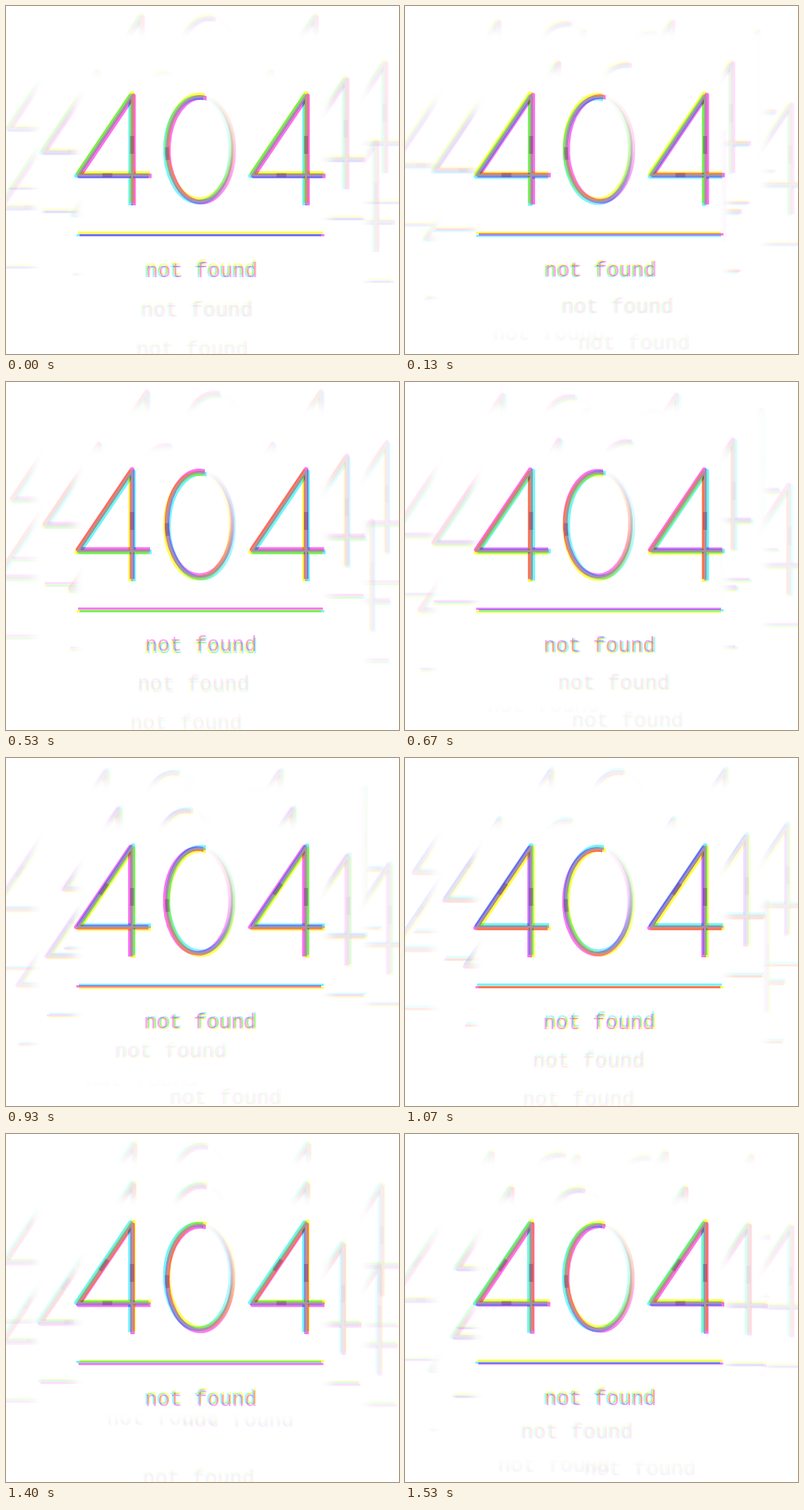
An HTML page with a canvas that plays this animation: 480x426 px, repeating every 1590 ms.

```html
<!DOCTYPE html>
<html lang="en">
<head>
<meta charset="utf-8">
<title>404 not found</title>
<style>
html, body { margin: 0; width: 100%; height: 100%; overflow: hidden; background: #fff; }
canvas { display: block; width: 480px; height: 426px; }
</style>
</head>
<body>
<canvas id="stage" width="480" height="426"></canvas>
<script>
const W = 480, H = 426, LOOP = 1590, STEPS = 24;
const TAU = Math.PI * 2, RAD = Math.PI / 180;
const INKS = [
  { rgb: [110, 244, 255], turn: 150 },
  { rgb: [255, 255, 70], turn: 270 },
  { rgb: [255, 110, 242], turn: 30 }
];
const ZERO = { x: 236.5, y: 175, rx: 40, ry: 64, gap: -84 * RAD };
const four = x => new Path2D(`M${x} 243V109L${x - 66} 207H${x + 22}`);
const fours = [four(154), four(366.5)];

const stage = document.getElementById('stage').getContext('2d');
const layer = () => {
  const c = document.createElement('canvas');
  c.width = W;
  c.height = H;
  return c.getContext('2d');
};
const art = layer(), ring = layer();

const css = ([r, g, b], a = 1) => `rgba(${r},${g},${b},${a})`;
const polar = (deg, rx, ry = rx) => [rx * Math.cos(deg * RAD), ry * Math.sin(deg * RAD)];

function zero(c, rgb, alpha = 1) {
  const g = c.createConicGradient(ZERO.gap, ZERO.x, ZERO.y);
  [[0, 0], [0.08, 0.12], [0.25, 0.4], [0.45, 0.9], [1, 1]]
    .forEach(([at, a]) => g.addColorStop(at, css(rgb, a * alpha)));
  c.strokeStyle = g;
  c.beginPath();
  c.ellipse(ZERO.x, ZERO.y, ZERO.rx, ZERO.ry, 0, ZERO.gap, ZERO.gap - TAU, true);
  c.stroke();
}

function digits(c, rgb, width, alpha = 1) {
  c.lineWidth = width;
  c.strokeStyle = css(rgb, alpha);
  fours.forEach(p => c.stroke(p));
  zero(c, rgb, alpha);
}

// Short dark patches along the strokes
function patches(c, k) {
  const spots = [[62, 22]];
  if ((k > 11 && k < 17) || k > 20) spots.push([188, 16]);
  if (k > 20 || k < 3) spots.push([282, 12]);
  c.lineWidth = 5;
  c.strokeStyle = 'rgba(90,30,100,.32)';
  for (const [at, len] of spots) {
    c.setLineDash([len, 999]);
    c.lineDashOffset = -at;
    fours.forEach(p => c.stroke(p));
  }
  c.setLineDash([]);
  c.beginPath();
  c.ellipse(ZERO.x, ZERO.y, ZERO.rx, ZERO.ry, 0, 168 * RAD, 182 * RAD);
  c.stroke();
}

function drawArt(k) {
  const c = art;
  c.clearRect(0, 0, W, H);
  c.lineJoin = 'round';
  c.textAlign = 'center';
  c.font = '25.3px "Liberation Mono", "Courier New", monospace';
  c.globalCompositeOperation = 'multiply';
  c.filter = 'blur(0.6px)';
  for (const { rgb, turn } of INKS) {
    const [dx, dy] = polar(turn - 15 * k, 2.1);
    c.save();
    c.translate(dx, dy);
    digits(c, rgb, 5.5);
    c.fillStyle = css(rgb);
    c.fillRect(88, 278.2, 299, 2.6);
    c.translate(-dx * 0.25, -dy * 0.25);
    c.fillStyle = css(rgb, 0.65);
    c.fillText('not found', 238, 331);
    c.restore();
  }
  c.globalCompositeOperation = 'source-over';
  digits(c, [188, 162, 196], 3, 0.72);
  patches(c, k);
  c.filter = 'none';
}

// Faint copies, hidden inside a soft box around the centre
function ghosts(k, count, rx, ry, alpha, box) {
  const c = ring;
  c.clearRect(0, 0, W, H);
  c.globalCompositeOperation = 'source-over';
  c.globalAlpha = alpha;
  for (let i = 0; i < count; i++) {
    const [dx, dy] = polar(96 - 14.5 * k + i * 360 / count, rx, ry);
    c.drawImage(art.canvas, dx, dy);
  }
  c.globalAlpha = 1;
  c.globalCompositeOperation = 'destination-out';
  c.filter = 'blur(6px)';
  c.fillRect(...box);
  c.filter = 'none';
  stage.drawImage(c.canvas, 0, 0);
}

function draw(k) {
  drawArt(k);
  stage.globalCompositeOperation = 'source-over';
  stage.fillStyle = '#fff';
  stage.fillRect(0, 0, W, H);
  stage.globalCompositeOperation = 'multiply';
  ghosts(k, 6, 105, 97, 0.15, [34, 30, 408, 374]);
  ghosts(k, 3, 53, 48.5, 0.24, [84, 77, 311, 275]);
  stage.drawImage(art.canvas, 0, 0);
}

let last = -1;
function tick() {
  const t = performance.now() % LOOP;
  const k = Math.min(STEPS - 1, Math.floor((t + 5) * 3 / 200));
  if (k !== last) draw(last = k);
  requestAnimationFrame(tick);
}
tick();
</script>
</body>
</html>
```
